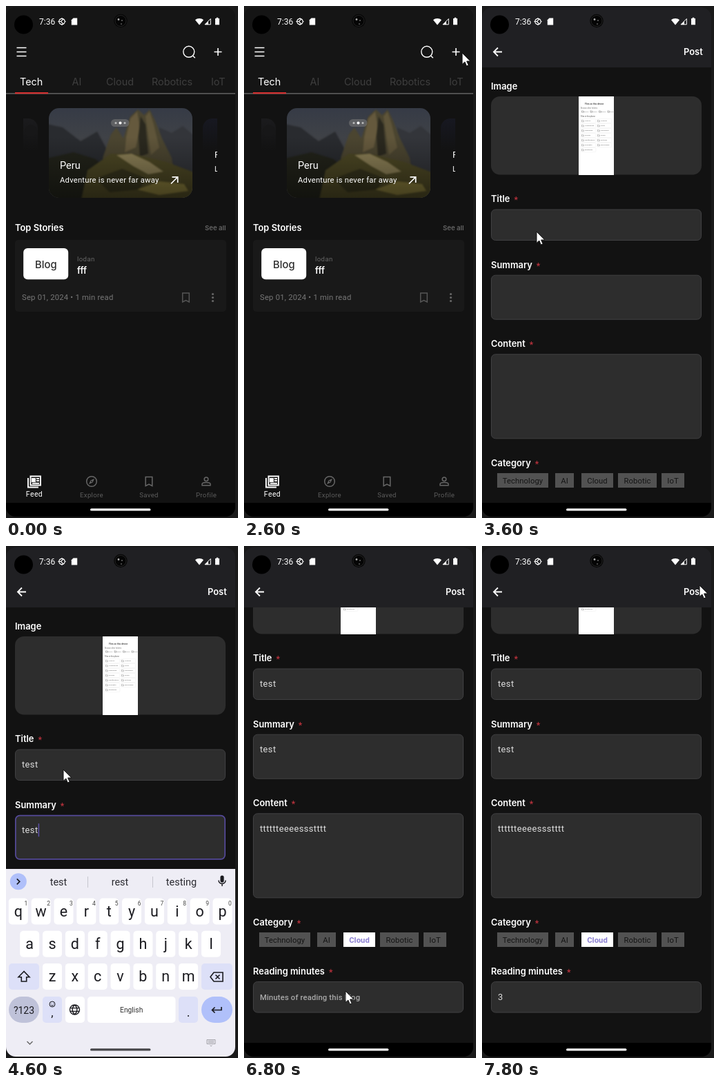
These frames come from a looping animation (336x742 px, 8000 ms). An HTML page with a canvas:

```html
<!DOCTYPE html>
<html lang="en">
<head>
<meta charset="utf-8">
<title>Blog app</title>
<style>
html, body { margin: 0; width: 100%; height: 100%; overflow: hidden; background: #1a1a1a; }
canvas { display: block; width: 336px; height: 742px; }
</style>
</head>
<body>
<canvas id="stage"></canvas>
<script>
const W = 336, H = 742, LOOP = 8000, STEP = 200;
const canvas = document.getElementById('stage');
const c = canvas.getContext('2d');
const dpr = window.devicePixelRatio || 1;
canvas.width = W * dpr;
canvas.height = H * dpr;

function text(s, x, y, size, color, { f = 'Roboto', w = 400, ls = 0, align = 'left' } = {}) {
  c.font = `${w} ${size}px ${f}, sans-serif`;
  c.letterSpacing = ls + 'px';
  c.textAlign = align;
  c.fillStyle = color;
  c.fillText(s, x, y);
  return c.measureText(s).width;
}
const title = (s, x, y, size, color) => text(s, x, y, size, color, { f: 'Inter', w: 600 });
function rect(x, y, w, h, color) {
  c.fillStyle = color;
  c.fillRect(x, y, w, h);
}
function box(x, y, w, h, r, fill, stroke, lw = 1) {
  c.beginPath();
  c.roundRect(x, y, w, h, r);
  if (fill) { c.fillStyle = fill; c.fill(); }
  if (stroke) { c.strokeStyle = stroke; c.lineWidth = lw; c.stroke(); }
}
function disc(x, y, r, color) {
  c.beginPath();
  c.arc(x, y, r, 0, 7);
  c.fillStyle = color;
  c.fill();
}
function poly(color, ...p) {
  c.beginPath();
  for (let i = 0; i < p.length; i += 2) c.lineTo(p[i], p[i + 1]);
  c.fillStyle = color;
  c.fill();
}
// Line width 0 fills the path.
function icon(d, x, y, color, lw = 0, s = 1) {
  c.save();
  c.translate(x, y);
  c.scale(s, s);
  const p = new Path2D(d);
  c.fillStyle = c.strokeStyle = color;
  c.lineWidth = lw;
  if (lw) c.stroke(p); else c.fill(p, 'evenodd');
  c.restore();
}
function clipped(x, y, w, h, r, draw) {
  c.save();
  c.beginPath();
  c.roundRect(x, y, w, h, r);
  c.clip();
  draw();
  c.restore();
}
function fade(y0, y1, a, b) {
  const g = c.createLinearGradient(0, y0, 0, y1);
  g.addColorStop(0, a);
  g.addColorStop(1, b);
  return g;
}

const ring = r => `M${r} 0A${r} ${r} 0 1 1-${r} 0A${r} ${r} 0 1 1 ${r} 0`;
const ICON = {
  menu: 'M-7-6H7M-7 0H7M-7 6H7',
  search: ring(8) + 'M5.6 5.6L9 9',
  plus: 'M-5.5 0H5.5M0-5.5V5.5',
  mark: 'M-4.8-6.5H4.8V6.5L0 4L-4.8 6.5Z',
  back: 'M6.5 0H-5M.5-6L-5.5 0L.5 6',
  out: 'M-5 5L4.5-4.5M-3.5-4.7H4.7V3.5',
  feed: 'M-5.5-7.5H9V5.5H-5.5ZM-9-5V8.5H6M-3-4H1V0H-3ZM-3-2H1M3-4H7M3-1H7M-3 2.8H7',
  compass: ring(7.3),
  needle: 'M4-4L1.5 1.5L-4 4L-1.5-1.5Z' + ring(.9),
  person: 'M2.8-3.3A2.8 2.8 0 1 1-2.8-3.3A2.8 2.8 0 1 1 2.8-3.3M-6 5.8V3.8C-6 .6 6 .6 6 3.8V5.8Z',
  gear: ring(4.2) + 'M-4 0H-1.5L1.8-3.4M-1.5 0L1.8 3.4M0-5.6V-4.2M0 5.6V4.2M5.6 0H4.2M-5.6 0H-4.2',
  card: 'M-1.5-5H4.2V5H-4.2V-2.2Z',
  wifi: 'M0 5L-6-2.3C-3-5.4 3-5.4 6-2.3Z',
  signal: 'M-4 4.3H4.3V-4Z',
  battery: 'M-3-4H-1.3V-5.3H1.3V-4H3V5.3H-3Z',
  tag: 'M-7-6.5H0L7.5 1L1 7.5L-7 0ZM-4.5-4A.5.5 0 1 1-4.5-3.9',
  clock: 'M-6.5-2.5A7 7 0 1 1-6 4M-8.5-4.5L-6.5-1.5L-3.5-3M0-4V.5L3 2.5',
  rows: 'M-6-5H6V5H-6ZM-6-1.7H6M-6 1.7H6M-2.7-5V5',
  grow: 'M-2-2L-5-5M-5-2V-5H-2M2-2L5-5M2-5H5V-2M-2 2L-5 5M-5 2V5H-2M2 2L5 5M5 2V5H2',
  folder: 'M-2.5-1.8H-.5L.2-1H2.5V2H-2.5Z',
  mic: 'M-2.6-5A2.6 2.6 0 0 1 2.6-5V0A2.6 2.6 0 0 1-2.6 0Z',
  micArm: 'M-5-.5C-5 6 5 6 5-.5M0 4.5V8',
  shift: 'M0-7.5L-8 .8H-3.7V7H3.7V.8H8Z',
  erase: 'M-9 0L-4-6.5H9V6.5H-4ZM-1.5-3L4.5 3M4.5-3L-1.5 3',
  enter: 'M7-4.5V0H-6M-2.5-4L-6.5 0L-2.5 4',
  globe: ring(7) + 'M-7-2.4H7M-7 2.4H7M0-7C-4.5-3-4.5 3 0 7C4.5 3 4.5-3 0-7',
  smile: ring(4) + 'M-2 .8C-1 2.6 1 2.6 2 .8M-1.6-1.5V-.7M1.6-1.5V-.7',
  right: 'M-2-4L2 0L-2 4',
  down: 'M-4-2L0 2L4-2',
  keys: 'M-6-4H6V2H-6ZM-4.5-2H4.5M-4.5 0H4.5M-1.5 4L0 5.5L1.5 4',
  pointer: 'M0 0V16.5L3.8 13L6.4 19L9.2 17.8L6.6 12H11.8Z'
};
const more = (x, y, color, gap = 5) => [-gap, 0, gap].forEach(d => disc(x, y + d, 1.6, color));

function statusBar(color) {
  disc(25.5, 27, 13.5, '#000');
  text('7:36', 48, 27, 12, color);
  icon(ICON.gear, 81, 22.5, color, 1.2);
  icon(ICON.card, 99, 22.5, color);
  icon(ICON.wifi, 280, 22.5, color);
  icon(ICON.signal, 292, 22.5, color, 1);
  poly(color, 288, 27, 293, 22, 293, 27);
  icon(ICON.battery, 306, 22, color);
  disc(166, 21.5, 9.7, '#050505');
  icon(ring(8), 166, 21.5, '#252525', 1);
  disc(163, 19.5, 1.4, '#aaa');
  disc(168, 21, .9, '#777');
  disc(167, 26, 1.2, '#444');
}
const navPill = color => box(122, 728.2, 87.5, 3.4, 1.7, color);
function navBar() {
  rect(0, 720, 332, 20, '#000');
  navPill('#fff');
}

function mountains() {
  rect(62, 148, 208, 130, fade(148, 240, '#363b46', '#4a4a48'));
  c.filter = `blur(${1.2 * dpr}px)`;
  poly('#292b2f', 55, 170, 82, 176, 108, 196, 132, 182, 150, 215, 140, 285, 55, 285);
  poly('#33353a', 222, 176, 240, 184, 256, 174, 275, 190, 275, 260, 215, 245);
  poly('#4b4530', 140, 220, 152, 186, 160, 176, 170, 192, 180, 160, 191, 150, 200, 158, 208, 150,
    216, 166, 226, 192, 240, 220, 244, 245, 150, 240);
  poly('#65593d', 180, 163, 190, 153, 194, 176, 188, 205, 172, 212, 174, 190);
  poly('#5f553a', 202, 160, 208, 153, 214, 172, 222, 205, 210, 216);
  poly('#2a281e', 195, 160, 202, 172, 206, 214, 194, 218, 192, 190);
  poly('#22231a', 55, 222, 98, 212, 130, 222, 152, 244, 130, 285, 55, 285);
  poly('#4c4724', 118, 238, 152, 214, 190, 216, 232, 226, 275, 242, 275, 285, 108, 285);
  poly('#8a7e55', 160, 216, 182, 214, 208, 226, 228, 240, 206, 244, 184, 232);
  poly('#35331c', 130, 250, 168, 236, 204, 250, 192, 266, 150, 270);
  poly('#807538', 190, 266, 222, 254, 258, 258, 264, 268, 222, 274);
  c.filter = 'none';
  rect(62, 148, 208, 130, fade(190, 278, '#0000', '#0007'));
}

function home() {
  rect(0, 0, W, H, '#121212');
  rect(0, 2, 332, 125, '#151515');
  statusBar('#fff');
  icon(ICON.menu, 22.5, 66.5, '#fff', 1.6);
  icon(ICON.search, 264.8, 66.3, '#fff', 1.4);
  icon(ICON.plus, 307, 66.5, '#fff', 1.6);

  const tabs = { Tech: 20, AI: 95.5, Cloud: 145, Robotics: 211, IoT: 297 };
  for (const name in tabs)
    text(name, tabs[name], 115, 14.4, name === 'Tech' ? '#fff' : '#3e3e3e', { f: 'Inter' });
  rect(0, 126.3, 332, 1.2, '#777');
  rect(13, 125, 48, 2.2, '#d32f2f');

  clipped(25, 140, 281, 150, 0, () => {
    box(-180, 163, 226, 105, 14, fade(163, 210, '#1b1b1d', '#121212'));
    disc(36, 181, 9, '#171718');
    box(285, 163, 200, 105, 14, fade(163, 210, '#171821', '#121212'));
    text('F', 302, 220, 13, '#fff');
    text('L', 302, 240, 10.5, '#fff');
  });
  clipped(62, 148, 208, 130, 15, mountains);
  box(152, 164, 26.5, 11, 5.5, '#7779');
  [159, 165.5, 172].forEach((x, i) => disc(x, 169.5, i === 1 ? 2 : 1.5, i === 1 ? '#fff' : '#bbb'));
  text('Peru', 78, 236, 14.5, '#fff');
  text('Adventure is never far away', 78, 256, 11.3, '#fff', { ls: .2 });
  icon(ICON.out, 244, 252.5, '#fff', 1.7);

  title('Top Stories', 13, 325.5, 12.9, '#fff');
  title('See all', 288, 325, 9.6, '#666');
  box(13, 339, 306, 104, 5, '#191919');
  box(25.2, 351, 65, 45.3, 6, '#fff');
  text('Blog', 42, 380, 14.8, '#2b2b2b', { f: 'Inter', w: 500 });
  text('lodan', 103, 370, 9.7, '#666', { ls: .35 });
  title('fff', 103, 387.5, 12.9, '#fff');
  text('Sep 01, 2024 • 1 min read', 23, 426, 11.3, '#777', { ls: .2 });
  icon(ICON.mark, 260.5, 422.5, '#555', 1.5);
  more(299.5, 422.5, '#666');

  icon(ICON.feed, 41, 689, '#fff', 1.9);
  icon(ICON.compass, 124, 689, '#666', 1.5);
  icon(ICON.needle, 124, 689, '#666');
  icon(ICON.mark, 207, 689, '#666', 1.5);
  icon(ICON.person, 290, 689, '#666', 1.5);
  text('Feed', 41, 711, 10.5, '#fff', { ls: .4, align: 'center' });
  ['Explore', 'Saved', 'Profile'].forEach((s, i) =>
    text(s, 124 + i * 83, 711.5, 9.7, '#5c5c5c', { ls: .3, align: 'center' }));
  navBar();
}

const FOLDERS = ['Alarms', 'Android', 'Audiobooks', 'DCIM', 'Download', 'Document', 'Movies',
  'Music', 'Notifications', 'Pictures', 'Podcasts', 'Recordings', 'Ringtones'];

function folders(x, y, dx, dy, size, s) {
  FOLDERS.forEach((name, i) => {
    const fx = x + i % 2 * dx, fy = y + (i >> 1) * dy;
    box(fx - dx * .1, fy - dy * .43, dx * .92, dy * .86, 1, '#fff', '#f0f0f0', .6);
    icon(ICON.folder, fx, fy, '#777', .7, s);
    text(name, fx + dx * .13, fy + size * .35, size, '#555');
  });
}

function picker() {
  rect(0, 0, W, H, '#fff');
  rect(0, 0, W, 82, '#fcfcfc');
  rect(0, 82, W, 6, fade(82, 88, '#00000018', '#0000'));
  statusBar('#666');
  icon(ICON.menu, 22.5, 63.5, '#444', 1.5, .95);
  text('Recent', 58, 69, 16, '#222', { w: 500 });
  icon(ICON.search, 271.5, 61, '#444', 2.2, .63);
  more(310.5, 63, '#444');
  box(19.5, 89.5, 93, 26, 13, '#fff', '#d5d5d5');
  box(120, 89.5, 92, 26, 13, '#fff', '#d5d5d5');
  icon(ICON.tag, 36, 102.5, '#444', 1.5);
  icon(ICON.clock, 136, 102.5, '#444', 1.5);
  text('Large files', 52, 106, 10.9, '#333', { w: 500 });
  text('This week', 152, 106, 10.9, '#333', { w: 500 });
  text('BROWSE FILES IN OTHER APPS', 19, 145, 8.7, '#333', { w: 500, ls: .25 });
  disc(82.5, 179, 9.5, '#e0ac3c');
  disc(248.5, 179, 9.5, '#e0574b');
  text('Stovo', 82.5, 210, 9.8, '#333', { align: 'center' });
  text('Pixuma', 248.5, 210, 9.8, '#333', { align: 'center' });
  text('Recent images', 19, 246, 9.8, '#222', { w: 500 });
  icon(ICON.rows, 292.5, 241.5, '#333', 1.4);
  c.save();
  c.shadowColor = '#0004';
  c.shadowBlur = 4;
  c.shadowOffsetY = 1;
  rect(19, 268, 93, 94, '#fdfdfd');
  c.restore();
  folders(30.5, 277, 41.5, 12.8, 3.8, 1);
  disc(92.5, 289, 10, '#7c7c7ce6');
  icon(ICON.grow, 92.5, 289, '#fff', 1.3);
  navPill('#ddd');
}

function label(s, y, needed = true) {
  const w = title(s, 13, y + 4.7, 12.9, '#fff');
  if (needed) text('*', 19 + w, y + 5.5, 13, '#c93540');
}
function field(y, h, value, focused, hint = '') {
  const lw = focused ? 1.7 : 1;
  box(13 + lw / 2, y + lw / 2, 305 - lw, h - lw, 6, '#2d2d2d', focused ? '#544999' : '#404042', lw);
  if (hint && !value && !focused) text(hint, 23, y + 26.5, 11.3, '#a9a9a9', { w: 500, ls: .13 });
  const w = text(value, 23, y + 26.5, 12.9, '#dedede', { ls: .4 });
  if (focused) rect(23.2 + w, y + 12.5, 1.4, 19, '#5f52b0');
}
function chips(picked) {
  const list = { Technology: [22, 74], AI: [106, 27], Cloud: [144, 46], Robotic: [197, 56], IoT: [260, 33] };
  for (const name in list) {
    const [x, w] = list[name], on = picked && name === 'Cloud';
    rect(x, 677, w, 21, on ? '#fff' : '#525252');
    text(name, x + w / 2, 691.5, 11.3, on ? '#8c80d2' : '#141414',
      { w: on ? 700 : 400, ls: .05, align: 'center' });
  }
}
function preview() {
  rect(140, 131, 51, 114, '#fff');
  text('Files on this device', 149, 142.5, 3.2, '#333', { w: 500 });
  text('Browse other folders', 143, 148.5, 2.6, '#777');
  for (let i = 0; i < 4; i++) {
    icon(ICON.folder, 146 + i * 12.5, 153, '#666', .8, .6);
    text('Docs', 148.5 + i * 12.5, 154, 2.5, '#666');
  }
  text('Files in this phone', 143, 161, 2.6, '#555');
  folders(146, 166.5, 23, 7, 2.5, .6);
}

const typed = (s, t, from, per) => s.slice(0, Math.max(0, Math.floor((t - from) / per)));

function focusAt(t) {
  if (t < 3800) return '';
  if (t < 4400) return 'title';
  if (t < 5000) return 'summary';
  if (t < 6200) return 'content';
  return t >= 7000 && t < 7400 ? 'minutes' : '';
}
function scrollAt(t, focus) {
  if (focus === 'content') return 146;
  if (focus === 'minutes') return 345;
  return t < 6200 ? 0 : 117;
}

function form(t) {
  const focus = focusAt(t);
  const value = {
    title: typed('test', t, 3800, 100),
    summary: typed('test', t, 4400, 50),
    content: typed('tttttteeeessstttt', t, 5000, 60),
    minutes: typed('3', t, 7000, 200)
  };
  rect(0, 0, W, H, '#121212');
  clipped(0, 89, 332, 631, 0, () => {
    c.translate(0, -scrollAt(t, focus));
    label('Image', 116.5, false);
    box(13, 131, 305, 113.5, 13, '#2d2d2d');
    if (t >= 3600) preview();
    label('Title', 279.5);
    field(294.5, 45.5, value.title, focus === 'title');
    label('Summary', 375);
    field(389.7, 65, value.summary, focus === 'summary');
    label('Content', 489.3);
    field(504.3, 123, value.content, focus === 'content');
    label('Category', 662);
    chips(t >= 6600);
    label('Reading minutes', 733);
    field(748, 45.5, value.minutes, focus === 'minutes', 'Minutes of reading this blog');
  });
  rect(0, 0, 332, 89, '#202023');
  statusBar('#fff');
  icon(ICON.back, 22.5, 66.5, '#fff', 1.8);
  title('Post', 292, 70.7, 12.9, '#fff');
  if (focus) keyboard(focus, value[focus]);
  else navBar();
}

function suggestions(focus, s) {
  if (!s || focus === 'minutes') return [];
  return focus === 'content' ? [s, 'ttttt teehee', 'ttttt terre'] : [s, 'rest', 'testing'];
}
function keyboard(focus, value) {
  const ink = '#1b1b20', tint = '#dde0f8';
  const key = (x, y, w, fill = '#fff', r = 5) => box(x, y, w, 38, r, fill);
  rect(0, 468, 332, 274, '#eeedf5');
  disc(17.8, 486.3, 12, '#b0c0fa');
  icon(ICON.right, 17.8, 486.3, ink, 1.7);
  rect(118, 479, 1, 16, '#c6c6ce');
  rect(212, 479, 1, 16, '#c6c6ce');
  suggestions(focus, value).forEach((s, i) =>
    text(s, 76 + i * 89, 492, 14.5, '#2a2a30', { align: 'center' }));
  icon(ICON.mic, 313, 485, ink);
  icon(ICON.micArm, 313, 485, ink, 1.5);

  ['qwertyuiop', 'asdfghjkl', 'zxcvbnm'].forEach((row, r) => {
    [...row].forEach((ch, i) => {
      const x = [17.8, 34.2, 67][r] + i * 32.85, y = 510.5 + r * 47.2;
      key(x - 14, y, 28);
      text(ch, x, y + 26.3, 21.5, ink, { align: 'center' });
      if (!r) text(String((i + 1) % 10), x + 11, y + 10.5, 8.5, '#444', { align: 'center' });
    });
  });
  key(4, 605, 44, tint);
  icon(ICON.shift, 26, 624, ink, 1.6);
  key(283, 605, 45, tint);
  icon(ICON.erase, 305, 624.5, ink, 1.6);

  key(4, 653, 44, '#bfc2d9', 19);
  text('?123', 26, 677.5, 14, ink, { align: 'center' });
  key(53, 653, 28, tint);
  icon(ICON.smile, 67, 664, ink, 1);
  text(',', 67, 682, 17, ink, { align: 'center' });
  key(86, 653, 28);
  icon(ICON.globe, 99.5, 672, ink, 1.4);
  key(118, 653, 127.5);
  text('English', 181.7, 676, 10.3, '#333', { align: 'center' });
  key(250, 653, 28, tint);
  text('.', 264, 682, 18, ink, { align: 'center' });
  key(283, 653, 45, '#b0c0fa', 19);
  icon(ICON.enter, 305, 672.5, ink, 1.7);
  icon(ICON.down, 34.5, 720, '#666', 1.4);
  icon(ICON.keys, 297, 719.5, '#9a9aa0', .9);
  navPill('#46464a');
}

// Pointer path: time, x, y
const PATH = [
  [2200, 334, 160], [2600, 316, 68], [2800, 316, 68], [3000, 190, 215], [3200, 137.5, 337],
  [3400, 75, 330], [3800, 83, 324], [6000, 83, 324], [6400, 165, 570], [6600, 165, 570],
  [6800, 147, 645], [7400, 147, 645], [7800, 315, 57]
];
function pointer(t) {
  if (t < PATH[0][0]) return;
  const i = PATH.findIndex(p => p[0] >= t);
  const b = PATH[i], a = PATH[Math.max(0, i - 1)];
  const k = b === a ? 0 : (t - a[0]) / (b[0] - a[0]);
  const x = a[1] + (b[1] - a[1]) * k, y = a[2] + (b[2] - a[2]) * k;
  icon(ICON.pointer, x, y, '#fff');
  icon(ICON.pointer, x, y, '#111', 1);
}

function draw(now) {
  const t = Math.floor(now % LOOP / STEP) * STEP;
  c.setTransform(dpr, 0, 0, dpr, 0, 0);
  rect(0, 0, W, H, '#1a1a1a');
  clipped(0, 2, 332, 738, 14, () => {
    if (t < 2800) home();
    else if (t >= 3200 && t < 3600) picker();
    else form(t);
  });
  pointer(t);
  requestAnimationFrame(draw);
}
requestAnimationFrame(draw);
</script>
</body>
</html>
```
